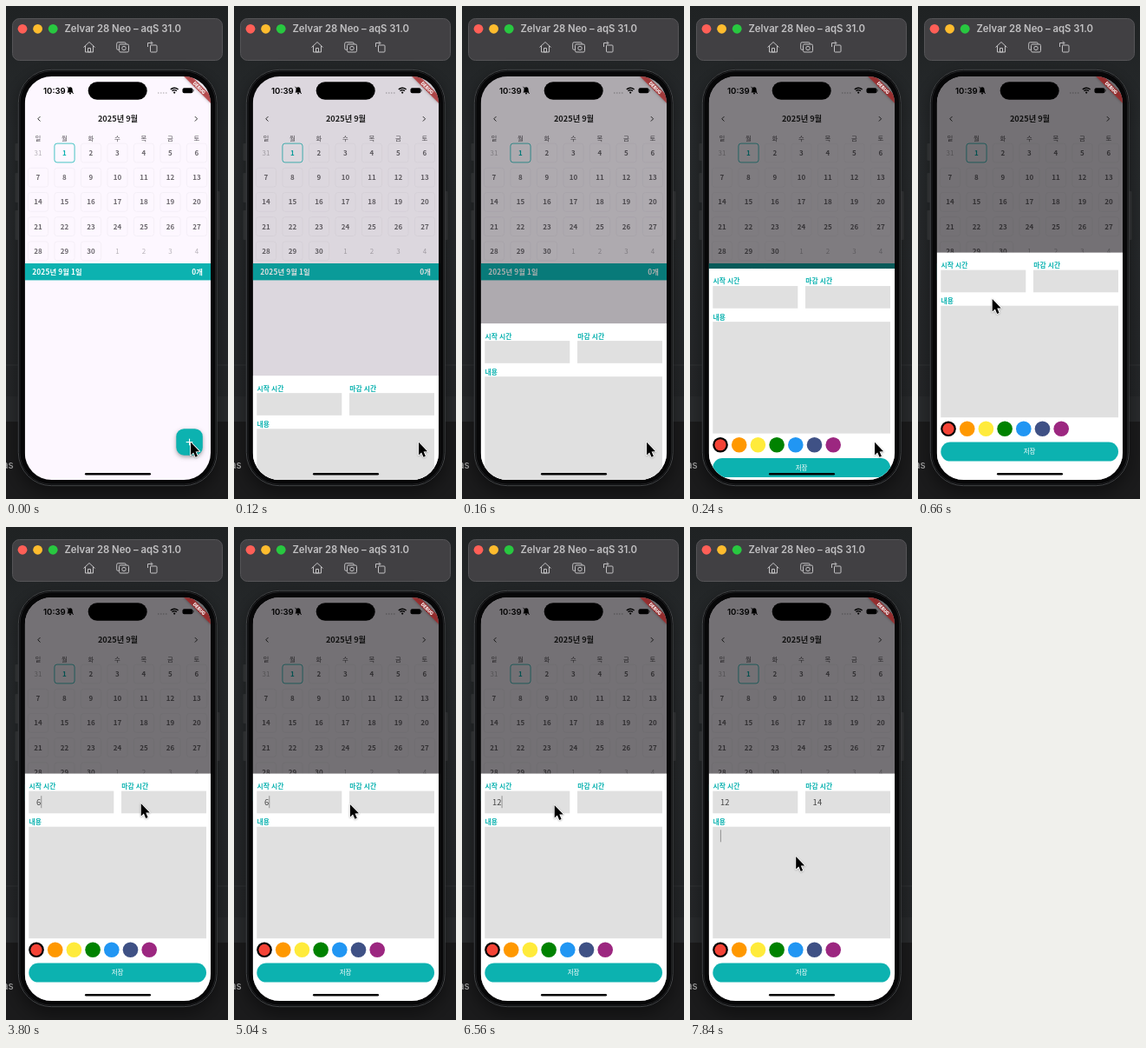
Animation of 256 by 567 pixels, one loop 8 s. Source, as an HTML page with a canvas:

```html
<!DOCTYPE html>
<html lang="ko">
<head>
<meta charset="utf-8">
<title>Calendar entry</title>
<style>
html, body { margin: 0; width: 100%; height: 100%; overflow: hidden; background: #1f2123; }
canvas { display: block; width: 256px; height: 567px; }
</style>
</head>
<body>
<canvas id="stage"></canvas>
<script>
const W = 256, H = 567, LOOP = 8000;
const TEAL = '#0cb2b0';
const KR = '"Noto Sans CJK KR", "Noto Sans CJK", sans-serif', UI = 'Inter, sans-serif';
const SCREEN = { x: 21.7, y: 81, w: 214.3, h: 464 };
const SHEET = { top: 283.6, h: 261.4, start: 77, ms: 250 };
const BLINK = { on: 520, fade: 80, period: 960 };
const canvas = document.getElementById('stage');
const c = canvas.getContext('2d');
const dpr = window.devicePixelRatio || 1;
canvas.width = W * dpr;
canvas.height = H * dpr;

const clamp = v => Math.min(1, Math.max(0, v));
const smooth = u => u * u * (3 - 2 * u);

function bezier(x1, y1, x2, y2) {
  const at = (a, b, s) => 3 * a * s * (1 - s) ** 2 + 3 * b * s * s * (1 - s) + s ** 3;
  return x => {
    let lo = 0, hi = 1;
    for (let i = 0; i < 24; i++) {
      const mid = (lo + hi) / 2;
      if (at(x1, x2, mid) < x) lo = mid; else hi = mid;
    }
    return at(y1, y2, lo);
  };
}
const decelerate = bezier(0, 0, 0.2, 1);
const ease = bezier(0.25, 0.1, 0.25, 1);

function rect(x, y, w, h, fill) {
  c.fillStyle = fill;
  c.fillRect(x, y, w, h);
}

function round(x, y, w, h, r, fill, stroke, lw = 1) {
  c.beginPath();
  c.roundRect(x, y, w, h, r);
  if (fill) { c.fillStyle = fill; c.fill(); }
  if (stroke) { c.strokeStyle = stroke; c.lineWidth = lw; c.stroke(); }
}

function arc(x, y, r, from, to, color, lw = 1) {
  c.beginPath();
  c.arc(x, y, r, from, to);
  c.strokeStyle = color;
  c.lineWidth = lw;
  c.stroke();
}

function disc(x, y, r, fill) {
  c.beginPath();
  c.arc(x, y, r, 0, 7);
  c.fillStyle = fill;
  c.fill();
}

function text(s, x, y, size, color, { weight = 400, align = 'left', family = KR, gap = 0 } = {}) {
  c.font = `${weight} ${size}px ${family}`;
  c.letterSpacing = `${gap}px`;
  c.textAlign = align;
  c.fillStyle = color;
  c.fillText(s, x, y);
}

function line(color, lw, ...points) {
  c.beginPath();
  points.forEach(([x, y]) => c.lineTo(x, y));
  c.strokeStyle = color;
  c.lineWidth = lw;
  c.stroke();
}

// Open arrow head; dir -1 points left, 1 points right.
function chevron(x, y, size, dir, color) {
  line(color, 1, [x - dir * size / 2, y - size], [x + dir * size / 2, y], [x - dir * size / 2, y + size]);
}

function withShadow(alpha, blur, dy, paint) {
  c.save();
  c.shadowColor = `rgba(0,0,0,${alpha})`;
  c.shadowBlur = blur * dpr;
  c.shadowOffsetY = dy * dpr;
  paint();
  c.restore();
}

function desktop() {
  const g = c.createLinearGradient(0, 0, 0, 478);
  g.addColorStop(0, '#1f2223');
  g.addColorStop(0.3, '#272a2c');
  g.addColorStop(1, '#242628');
  rect(0, 0, W, H, g);
  rect(0, 412.5, W, 1, '#323436');
  rect(0, 449, W, 29, '#292b2d');
  rect(0, 478, W, 89, '#1b1b1c');
  text('as', -4, 531.5, 11.5, '#a5a5a5', { weight: 500, family: UI });
}

function titleBar() {
  const ink = '#c2c1c3', bar = '#414043';
  round(7.5, 14.5, 242, 48, 8, bar, '#555457');
  ['#ff5f57', '#febc2e', '#28c840'].forEach((color, i) => disc(19 + i * 17.6, 26.3, 5.4, color));
  text('Zelvar 28 Neo – aqS 31.0', 67.5, 30, 11.3, ink, { weight: 600, family: UI });
  line(ink, 1, [89.5, 47.5], [96, 41.5], [102.5, 47.5]);
  line(ink, 1, [91.5, 46], [91.5, 53], [100.5, 53], [100.5, 46]);
  round(94.5, 48.5, 3, 4.5, 0, null, ink);
  round(127.7, 41.8, 10.5, 8.5, 1.5, null, ink);
  round(130.5, 44, 11, 9, 1.5, bar, ink);
  arc(136, 48.5, 2.2, 0, 7, ink);
  round(166.5, 45, 7.5, 8, 1, null, ink);
  line(ink, 1, [163.5, 47], [163.5, 42.5], [168.5, 42.5]);
  chevron(168, 42.5, 2, 1, ink);
}

function phoneBody() {
  for (const [x, y, h] of [[10.5, 158, 20], [10.5, 192, 34], [10.5, 235, 34], [242.5, 213, 56]])
    round(x, y, 4, h, 1, '#37393b');
  withShadow(0.45, 20, 8, () => round(14, 73, 229.5, 479, 38, '#070708'));
  round(14.3, 73.3, 228.9, 478.4, 38, null, '#4a4c4e', 0.9);
  round(16, 75, 225.5, 475, 36, null, '#1f2022');
}

function calendar() {
  const bold = { weight: 700, gap: 0.14 };
  rect(SCREEN.x, SCREEN.y, SCREEN.w, SCREEN.h, '#fdf7ff');
  text('2025년 9월', 129, 133.3, 9.2, '#222', { weight: 700, align: 'center' });
  chevron(38.1, 129.8, 2.7, -1, '#333');
  chevron(219.2, 129.8, 2.7, 1, '#333');
  const column = i => 37 + i % 7 * 30.5;
  [...'일월화수목금토'].forEach((d, i) => text(d, column(i), 154.6, 7.4, '#555157', { align: 'center' }));
  for (let i = 0; i < 35; i++) {
    const x = column(i), y = 169 + Math.floor(i / 7) * 28.2;
    const inside = i > 0 && i < 31, today = i === 1;
    const day = i === 0 ? 31 : inside ? i : i - 30;
    if (inside) round(x - 11.6, y - 10.9, 23.2, 21.8, 3, null, today ? TEAL : '#f2ecf4', 0.75);
    const color = today ? TEAL : inside ? '#6c686e' : '#b7b2b9';
    text(day, x, y + 3, 8, color, { weight: inside ? 700 : 400, align: 'center', gap: 0.14 });
  }
  rect(SCREEN.x, 296, SCREEN.w, 19.4, TEAL);
  text('2025년 9월 1일', 30.3, 309, 8.3, '#fff', bold);
  text('0개', 227, 309, 8.3, '#fff', { ...bold, align: 'right' });
  withShadow(0.35, 5, 2, () => round(196.3, 486.2, 30.5, 30.5, 9, TEAL));
  rect(207.7, 501, 7.6, 1.1, '#fff');
  rect(211, 497.7, 1.1, 7.6, '#fff');
}

const FIELDS = [
  { x: 26.3, y: 303.6, w: 98, h: 25.7, label: '시작 시간' },
  { x: 133, y: 303.6, w: 98, h: 25.7, label: '마감 시간' },
  { x: 26.3, y: 344.7, w: 204.7, h: 128.5, label: '내용' }
];

// Focus and typing: time, field, its value from then on.
const EDITS = [
  [1200, 0, ''], [3680, 0, '6'], [5900, 0, ''], [6200, 0, '1'], [6300, 0, '12'],
  [6900, 1, ''], [7220, 1, '1'], [7340, 1, '14'], [7830, 2, '']
];

function caretAlpha(age) {
  const p = age % BLINK.period;
  return Math.max(clamp((BLINK.on + BLINK.fade - p) / BLINK.fade), clamp((p - BLINK.period) / BLINK.fade + 1));
}

function field(f, i, past, t) {
  text(f.label, f.x + 0.2, f.y - 2.6, 7.8, TEAL, { weight: 700, gap: 0.14 });
  rect(f.x, f.y, f.w, f.h, '#e0e0e0');
  const value = past.filter(e => e[1] === i).map(e => e[2]).pop() || '';
  const x = f.x + 8.6;
  text(value, x, f.y + 16.5, 9.4, '#444', { gap: 0.14 });
  const last = past[past.length - 1];
  if (!last || last[1] !== i) return;
  c.globalAlpha = caretAlpha(t - last[0]);
  rect(x + c.measureText(value).width, f.y + (i === 2 ? 3.6 : 5.6), 1, 14, '#929292');
  c.globalAlpha = 1;
}

function sheet(t, p) {
  c.save();
  c.translate(0, SHEET.h * (1 - p));
  rect(SCREEN.x, SHEET.top, SCREEN.w, SHEET.h, '#fff');
  const past = EDITS.filter(e => e[0] <= t);
  FIELDS.forEach((f, i) => field(f, i, past, t));
  ['#f44336', '#ff9800', '#ffeb3b', '#008200', '#2196f3', '#3f5185', '#9c2780'].forEach((color, i) => {
    const x = 35 + i * 21.7;
    disc(x, 486.3, 8.8, i ? color : '#000');
    if (!i) disc(x, 486.3, 6.6, color);
  });
  round(26.3, 501.6, 204.7, 22, 11, TEAL);
  text('저장', 128.6, 515.3, 7.5, '#fff', { weight: 500, align: 'center' });
  c.restore();
}

function debugBanner() {
  c.save();
  c.translate(236, 81);
  c.rotate(Math.PI / 4);
  withShadow(0.5, 3.3, 0, () => rect(-21.8, 15.3, 43.6, 6.5, 'rgba(183,28,28,.66)'));
  text('DEBUG', 0, 20.5, 5.5, '#fff', { weight: 900, align: 'center', family: 'Roboto, sans-serif' });
  c.restore();
}

function statusBar() {
  text('10:39', 43, 101, 9.6, '#000', { weight: 600, family: UI });
  c.beginPath();
  c.moveTo(70.5, 99.5);
  c.quadraticCurveTo(71.5, 98, 71.5, 96);
  c.arc(74, 95.8, 2.5, Math.PI, 0);
  c.quadraticCurveTo(76.5, 98, 77.5, 99.5);
  c.fillStyle = '#000';
  c.fill();
  disc(74, 100.5, 1, '#000');
  line('#000', 0.9, [70.5, 92.8], [77.8, 101]);
  round(94.7, 87.2, 68, 20.6, 10.3, '#000');
  for (let i = 0; i < 4; i++) disc(175.8 + i * 3, 100, 0.8, 'rgba(0,0,0,.3)');
  for (const r of [3.6, 6]) arc(194.2, 100.2, r, -Math.PI * 0.76, -Math.PI * 0.24, '#000', 1.4);
  disc(194.2, 99.6, 1.1, '#000');
  round(203.5, 94.2, 12, 6, 2, '#000');
  rect(216, 96, 0.9, 2.4, 'rgba(0,0,0,.45)');
  debugBanner();
}

// Pointer moves: start, end, tip reached.
const MOVES = [
  [280, 660, 85, 336], [660, 1740, 109, 317], [3480, 3800, 155, 317],
  [4800, 5320, 106, 319], [6560, 6820, 155, 318], [7180, 7540, 121.5, 378]
];

function pointer(t) {
  let x = 212.3, y = 500.8;
  for (const [from, to, mx, my] of MOVES) {
    const s = smooth(clamp((t - from) / (to - from)));
    x += (mx - x) * s;
    y += (my - y) * s;
  }
  c.save();
  c.translate(x, y);
  c.beginPath();
  for (const [px, py] of [[0.7, 1], [0.7, 15.6], [3.9, 12.6], [6.2, 17.9], [8.6, 16.9], [6.3, 11.6], [10.8, 11.4]])
    c.lineTo(px, py);
  c.closePath();
  c.lineJoin = 'round';
  c.strokeStyle = '#fff';
  c.lineWidth = 1.7;
  withShadow(0.3, 2, 0.5, () => c.stroke());
  c.fillStyle = '#000';
  c.fill();
  c.restore();
}

function draw(t) {
  c.setTransform(dpr, 0, 0, dpr, 0, 0);
  desktop();
  titleBar();
  phoneBody();
  const u = clamp((t - SHEET.start) / SHEET.ms);
  c.save();
  c.beginPath();
  c.roundRect(SCREEN.x, SCREEN.y, SCREEN.w, SCREEN.h, 31);
  c.clip();
  calendar();
  if (u > 0) {
    rect(SCREEN.x, SCREEN.y, SCREEN.w, SCREEN.h, `rgba(0,0,0,${0.54 * ease(u)})`);
    sheet(t, decelerate(u));
  }
  statusBar();
  round(91, 537, 76, 2.6, 1.3, '#000');
  c.restore();
  pointer(t);
}

const began = performance.now();
function tick() {
  draw((performance.now() - began) % LOOP);
  requestAnimationFrame(tick);
}
tick();
</script>
</body>
</html>
```
